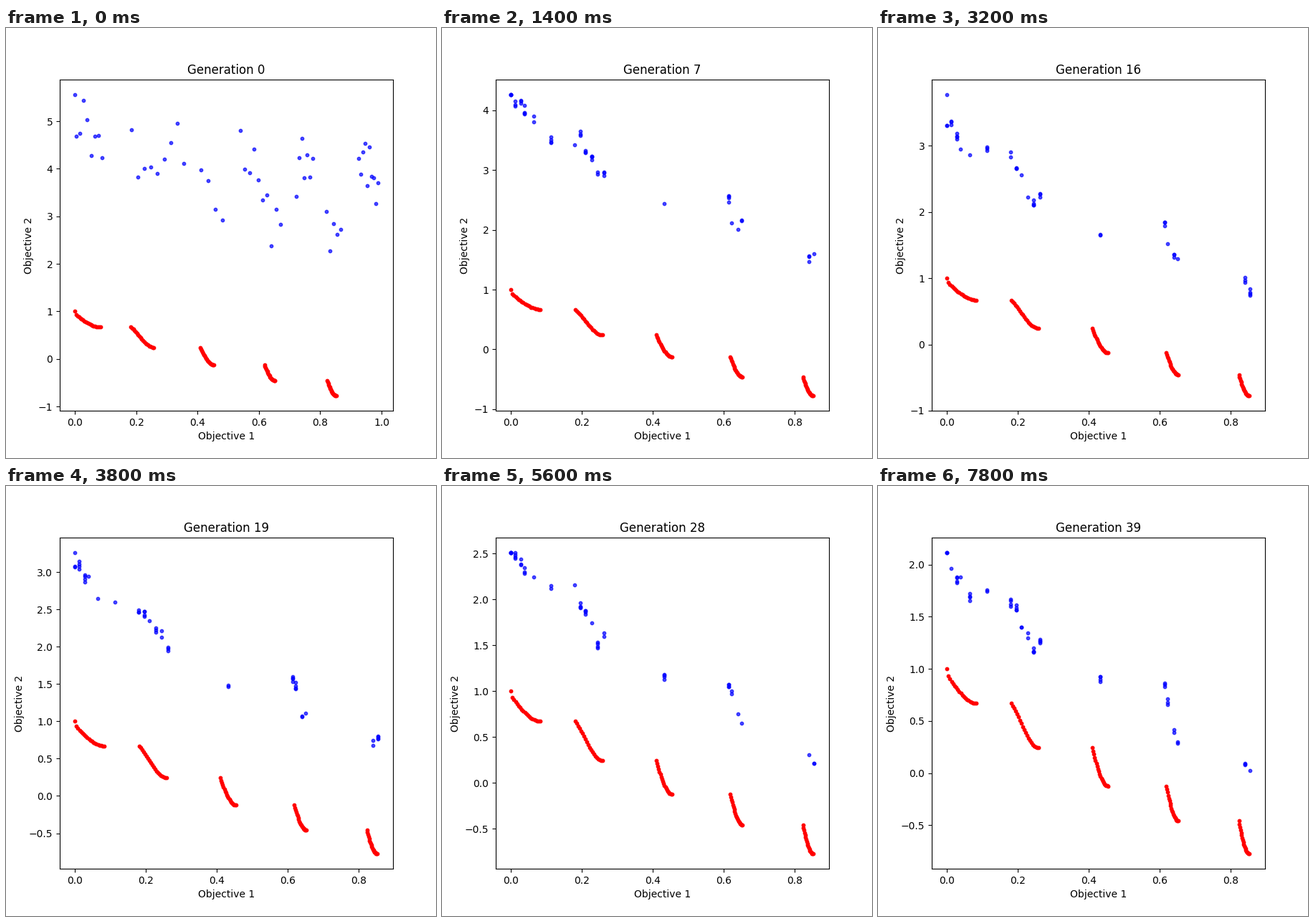
A matplotlib script that plays this animation: 600x600 px, repeating every 8000 ms.

```python
import matplotlib.pyplot as plt
import numpy as np
from matplotlib.animation import FuncAnimation

GENERATIONS = 40
STEP_MS = 200
SETTLED = 7    # generation by which the starting cloud is gone
LIFETIME = 4   # generations a column of solutions stays the same
GOLDEN = 0.618034

# Objective 1 values the population gathers at
COLUMNS = [0, .012, .028, .038, .065, .113, .18, .196, .21, .228, .244, .263,
           .433, .614, .622, .64, .65, .841, .854]
# Start, end and size of the groups in the starting cloud
CLOUD = [(.004, .089, 8), (.184, .355, 9), (.411, .481, 4), (.54, .67, 10),
         (.722, .775, 7), (.82, .867, 5), (.925, .988, 10)]
# Pieces of the Pareto front
FRONT = [(0, .0830015), (.1822287, .2577624), (.4093137, .4538821),
         (.6183968, .6525117), (.8233318, .8518329)]
# Highest solution over the generations
TOP_GENS = [0, 7, 16, 18, 23, 28, 33, 39]
TOP_VALS = [5.56, 4.26, 3.772, 3.28, 3.185, 2.51, 2.43, 2.115]


def objective(x, g):
    return g - np.sqrt(x * g) - x * np.sin(10 * np.pi * x)


def mean_g(gen):
    """Average distance factor, decaying towards the front (g = 1)."""
    return 1.6 + 3.8 * np.exp(-gen / 21)


def spans(parts):
    return np.concatenate([np.linspace(lo, hi, n) for lo, hi, n in parts])


def cloud(gen):
    """What is left of the random start; the right side dies out first."""
    rng = np.random.default_rng(3)
    x = spans(CLOUD)
    g = mean_g(gen) * rng.uniform(0.87, 1.14, len(x))
    alive = rng.random(len(x)) >= gen / SETTLED * (1 + x)
    return x[alive], g[alive]


def column(i, gen):
    """A short vertical stack of solutions sharing one x."""
    rng = np.random.default_rng([i, (gen + i) // LIFETIME])
    n = rng.integers(1, 5)
    factor = 1 + rng.uniform(-0.04, 0.06) + rng.uniform(-0.02, 0.02, n)
    return np.full(n, COLUMNS[i]), mean_g(gen) * factor


def population(gen):
    groups = [cloud(gen)]
    for i in range(len(COLUMNS)):
        if i * GOLDEN % 1 < gen / SETTLED:
            groups.append(column(i, gen))
    x, g = np.concatenate(groups, axis=1)
    top = np.interp(gen, TOP_GENS, TOP_VALS)
    y = np.minimum(objective(x, g), top)
    return np.append(x, 0), np.append(y, top)


front_x = spans([(lo, hi, 20) for lo, hi in FRONT])
front_y = objective(front_x, 1)

fig, ax = plt.subplots(figsize=(6, 6), dpi=100)


def draw(gen):
    ax.clear()
    ax.scatter(*population(gen), s=10, color="blue", alpha=0.7)
    ax.scatter(front_x, front_y, s=10, color="red")
    ax.set_title(f"Generation {gen}")
    ax.set_xlabel("Objective 1")
    ax.set_ylabel("Objective 2")


anim = FuncAnimation(fig, draw, frames=GENERATIONS, init_func=lambda: None,
                     interval=STEP_MS, repeat=True, repeat_delay=0)
plt.show()
```
